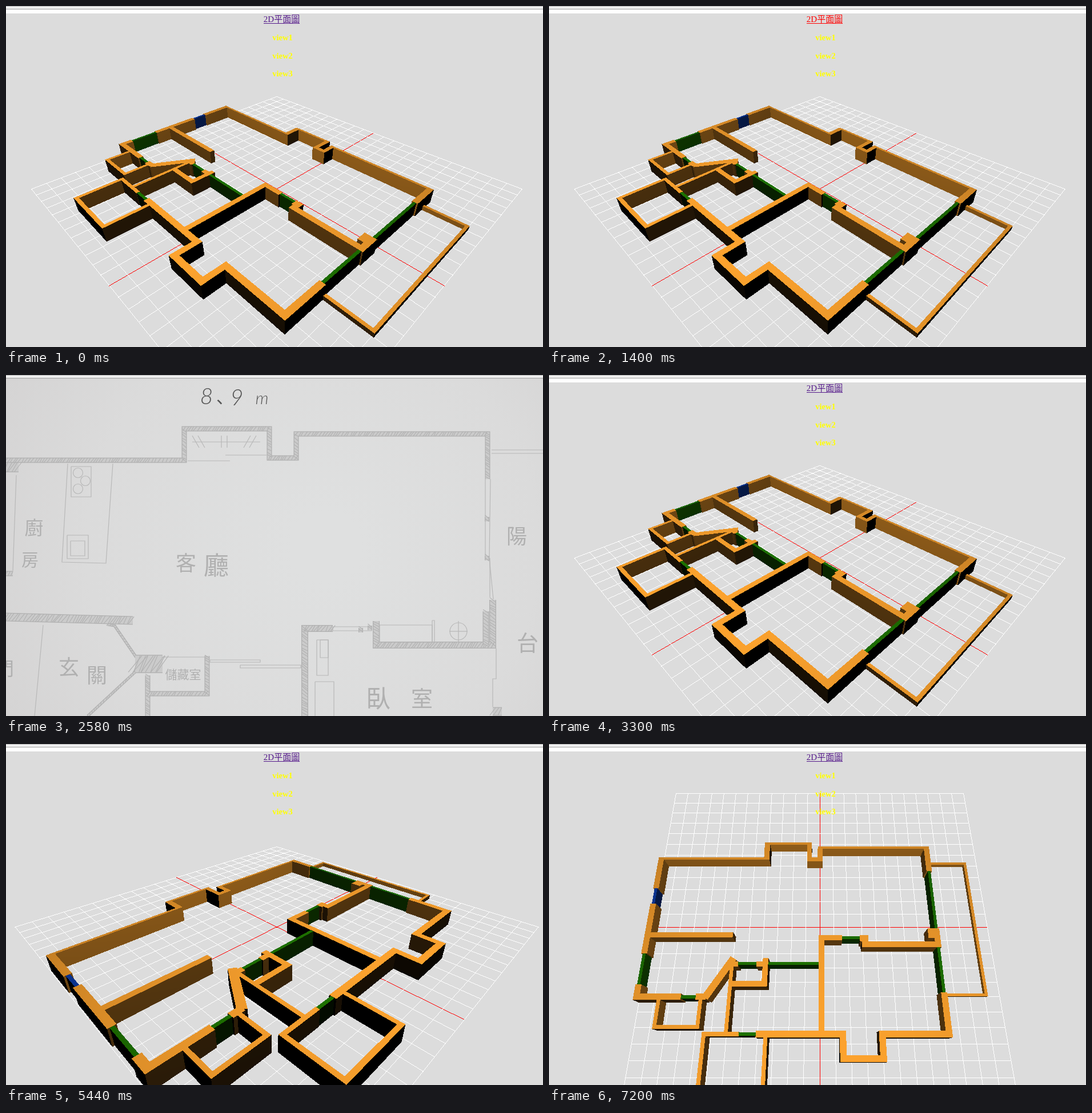
An HTML page with a canvas that plays this animation: 940 px wide and 596 px high, repeating every 8 s.

```html
<!DOCTYPE html>
<html lang="zh-Hant">
<head>
<meta charset="utf-8">
<title>Floor plan</title>
<style>
html, body { margin: 0; width: 100%; height: 100%; overflow: hidden; background: #dcdcdc; }
canvas { display: block; }
</style>
</head>
<body>
<canvas id="stage" width="940" height="596"></canvas>
<script>
const W = 940, H = 596, TOP = 13, CX = 474, CY = 320, FOCAL = 658;
const LIGHT = [0, 250, 100];
const ORANGE = [253, 163, 46], GREEN = [30, 116, 0], BLUE = [12, 62, 172];
const CJK = '"Noto Sans CJK JP", "Noto Sans CJK TC", "Noto Sans CJK", sans-serif';

// Right-angled path: a start point, then the next x, next y, next x, ...
function corners(x, y, ...rest) {
  const pts = [[x, y]];
  rest.forEach((v, i) => {
    if (i % 2) y = v; else x = v;
    pts.push([x, y]);
  });
  return pts;
}

// Calls fn(a, b, direction, length) for each segment that has a length
function eachSegment(pts, fn) {
  for (let i = 1; i < pts.length; i++) {
    const [a, b] = [pts[i - 1], pts[i]];
    const dx = b[0] - a[0], dy = b[1] - a[1], len = Math.hypot(dx, dy);
    if (len) fn(a, b, [dx / len, dy / len], len);
  }
}

// The model: wall runs along their centre lines, seen from above
const solids = [];
function build(thick, pts, color = ORANGE, height = 10) {
  const r = thick / 2;
  eachSegment(pts, (a, b, [dx, dz]) => {
    const at = (p, along, side) =>
      [p[0] + r * (along * dx - side * dz), p[1] + r * (along * dz + side * dx)];
    solids.push({ base: [at(a, -1, -1), at(b, 1, -1), at(b, 1, 1), at(a, -1, 1)], color, height });
  });
}
const run = (thick, ...path) => build(thick, corners(...path));
const panel = (color, ...path) => build(2, corners(...path), color, 9.9);

// Outer walls
run(4, -117.5, -50, -117.5, -28);
run(4, -117.5, -12, -117.5, 21);
run(4, -117.5, 46, -117.5, 52, -91);
run(2, -118, -51, -40);
run(4, -39.4, -63, -39.4, -52);
run(2, -40, -64, -7);
run(3.5, -7.75, -63.2, -7.75, -50, 0.25, -59.3);
run(2, 0.25, -60, 81);
run(4, 80, -59, 80, -42);
run(4, 80, 51, 80, 75, 38.6, 89.4, 14.3, 75, -37.6);
// Bedroom, pillar and kitchen
run(4, 80, 7, 80, 16.5, 30.6);
run(6, 77, 8, 77, 9);
run(4.6, 29.6, 12.3, 30.7);
run(3.8, 13.4, 11.8, 1.1, 72);
run(3.8, -116, 9.5, -61.2);
// Hall and closet
run(4, -77.5, 52, -75);
build(4.8, [[-58.7, 28.2], [-72.4, 50.6]]);
run(3.6, -57, 30.2, -55.8);
run(3.6, -40.2, 30.2, -36);
run(3.6, -36, 27.9, -36, 43.5, -57.5);
run(2.4, -58.1, 28, -58.1, 75);
// Side rooms
run(2.4, -103, 55, -103, 70.8, -76.2, 55);
run(2.5, -51.3, 75, -71.7, 105.3, -33.5, 77);
// Doors and windows
panel(BLUE, -117.5, -27, -117.5, -13);
panel(GREEN, -117.5, 22, -117.5, 45);
panel(GREEN, 80, -41, 80, 50);
panel(GREEN, 14, 11.6, 29);
panel(GREEN, -90, 52, -78);
panel(GREEN, -55, 30, -1);
panel(GREEN, -51, 75, -38);
build(2, corners(83, -50.4, 110, 49.2, 83), ORANGE, 3);

const dot = (a, b) => a[0] * b[0] + a[1] * b[1] + a[2] * b[2];

function makeLayer() {
  const layer = document.createElement("canvas");
  layer.width = W;
  layer.height = H;
  return [layer, layer.getContext("2d")];
}

// Camera that looks at the middle of the floor
function makeCamera(pos) {
  const dist = Math.hypot(...pos), flat = Math.hypot(pos[0], pos[2]);
  const fwd = pos.map(v => -v / dist);
  const right = [pos[2] / flat, 0, -pos[0] / flat];
  const up = [right[1] * fwd[2] - right[2] * fwd[1],
              right[2] * fwd[0] - right[0] * fwd[2],
              right[0] * fwd[1] - right[1] * fwd[0]];
  return p => {
    const w = dist + dot(fwd, p);
    return { x: CX + FOCAL * dot(right, p) / w, y: CY - FOCAL * dot(up, p) / w, q: 1 / w, p };
  };
}

function renderView(pos) {
  const project = makeCamera(pos);
  const [layer, ctx] = makeLayer();
  ctx.fillStyle = "#dcdcdc";
  ctx.fillRect(0, 0, W, H);
  const image = ctx.getImageData(0, 0, W, H), px = image.data;
  const depth = new Float32Array(W * H);

  function plot(x, y, q, r, g, b) {
    if (x < 0 || x >= W || y < TOP || y >= H) return;
    const i = y * W + x;
    if (q <= depth[i]) return;
    depth[i] = q;
    px[i * 4] = r;
    px[i * 4 + 1] = g;
    px[i * 4 + 2] = b;
  }

  function triangle(a, b, c, normal, color) {
    const area = (b.x - a.x) * (c.y - a.y) - (b.y - a.y) * (c.x - a.x);
    if (Math.abs(area) < 1e-6) return;
    const xs = [a.x, b.x, c.x], ys = [a.y, b.y, c.y];
    const x0 = Math.max(0, Math.floor(Math.min(...xs))), x1 = Math.min(W - 1, Math.ceil(Math.max(...xs)));
    const y0 = Math.max(TOP, Math.floor(Math.min(...ys))), y1 = Math.min(H - 1, Math.ceil(Math.max(...ys)));
    for (let y = y0; y <= y1; y++) for (let x = x0; x <= x1; x++) {
      const sx = x + 0.5, sy = y + 0.5;
      const u = ((c.x - b.x) * (sy - b.y) - (c.y - b.y) * (sx - b.x)) / area;
      const v = ((a.x - c.x) * (sy - c.y) - (a.y - c.y) * (sx - c.x)) / area;
      const t = 1 - u - v;
      if (u < 0 || v < 0 || t < 0) continue;
      const q = u * a.q + v * b.q + t * c.q;
      const ray = LIGHT.map((l, k) => l - (u * a.q * a.p[k] + v * b.q * b.p[k] + t * c.q * c.p[k]) / q);
      const lit = Math.max(0, dot(normal, ray) / Math.hypot(...ray));
      plot(x, y, q, color[0] * lit, color[1] * lit, color[2] * lit);
    }
  }

  function quad(points, normal, color) {
    const [a, b, c, d] = points.map(project);
    triangle(a, b, c, normal, color);
    triangle(a, c, d, normal, color);
  }

  function solid({ base, color, height }) {
    quad(base.map(([x, z]) => [x, height, z]), [0, 1, 0], color);
    eachSegment([...base, base[0]], ([x0, z0], [x1, z1], [dx, dz]) => {
      // Only sides turned to the camera
      if (dz * (pos[0] - x0) - dx * (pos[2] - z0) <= 0) return;
      quad([[x0, 0, z0], [x1, 0, z1], [x1, height, z1], [x0, height, z0]], [dz, 0, -dx], color);
    });
  }

  function line(from, to, color) {
    const a = project(from), b = project(to);
    const n = Math.ceil(Math.max(Math.abs(b.x - a.x), Math.abs(b.y - a.y)));
    for (let i = 0; i <= n; i++) {
      const t = i / n;
      plot(Math.floor(a.x + (b.x - a.x) * t), Math.floor(a.y + (b.y - a.y) * t),
        a.q + (b.q - a.q) * t, ...color);
    }
  }

  solids.forEach(solid);
  const cross = (k, color) => {
    line([-120, 0, k], [120, 0, k], color);
    line([k, 0, -120], [k, 0, 120], color);
  };
  cross(0, [255, 0, 0]);
  for (let k = -120; k <= 120; k += 10) if (k) cross(k, [255, 255, 255]);
  ctx.putImageData(image, 0, 0);
  return layer;
}

// Pencil drawing of the same flat
function renderPlan() {
  const [layer, ctx] = makeLayer();
  const paper = ctx.createRadialGradient(560, 300, 60, 520, 300, 620);
  paper.addColorStop(0, "#dfe0e0");
  paper.addColorStop(0.6, "#dbdbdb");
  paper.addColorStop(1, "#d4d3d3");
  ctx.fillStyle = paper;
  ctx.fillRect(0, 0, W, H);

  let seed = 7;
  const random = () => (seed = seed * 16807 % 2147483647) / 2147483647;

  function stroke(pts, color, width) {
    ctx.beginPath();
    pts.forEach(p => ctx.lineTo(...p));
    ctx.strokeStyle = color;
    ctx.lineWidth = width;
    ctx.stroke();
  }
  function hatch(width, pts) {
    stroke(pts, "#b0b0b0", width);
    stroke(pts, "#cbcbcb", width - 2.5);
    eachSegment(pts, ([x, y], _, [dx, dy], len) => {
      for (let s = 0; s < len; s += 3 + 4 * random()) {
        const r = width * 0.45, lean = r * (0.4 + 0.5 * random());
        const end = k => [x + dx * (s + k * lean) + k * dy * r, y + dy * (s + k * lean) - k * dx * r];
        stroke([end(-1), end(1)], "#b2b2b2", 1.2);
      }
    });
  }
  const thin = pts => stroke(pts, "#b8b8b8", 1.2);
  const wall = (width, ...path) => hatch(width, corners(...path));
  const edge = (...path) => thin(corners(...path));
  const box = (x, y, w, h) => edge(x, y, x + w, y + h, x, y);
  function ring(x, y, r) {
    ctx.beginPath();
    ctx.arc(x, y, r, 0, 7);
    ctx.stroke();
  }
  function word(text, x, y, size) {
    ctx.font = `300 ${size}px ${CJK}`;
    ctx.fillText(text, x, y);
  }

  // Outer walls and the niche
  wall(20, 0, 160, 22);
  wall(9, 0, 149, 312, 94, 461, 145, 508, 103, 843, 182);
  edge(318, 150, 392);
  edge(384, 140, 456);
  edge(326, 117, 445);
  for (let i = 0; i < 6; i++) {
    const x = 332 + 45 * (i >> 1) + 10 * (i % 2), lean = 6 - 6 * (i >> 1);
    thin([[x - lean, 106], [x + lean, 127]]);
  }

  // Windows and balcony
  edge(839, 182, 839, 320);
  thin([[848, 182], [846, 320], [853, 392]]);
  edge(847, 320, 847, 388);
  edge(858, 478, 858, 531, 852, 580);
  for (const y of [131, 137]) edge(850, y, 940);
  for (const [x, y] of [[842, 252], [842, 320], [621, 446], [637, 442]]) wall(8, x, y - 4, x, y + 4);

  // Bedroom
  wall(12, 852, 393, 852, 472, 648, 430);
  wall(11, 840, 413, 840, 472);
  wall(12, 572, 443, 523, 596);
  wall(15, 852, 588, 868);
  box(572, 440, 68, 7);
  box(654, 437, 92, 30);
  box(746, 429, 4, 38);
  ring(792, 448, 15);
  edge(792, 430, 792, 466);
  edge(776, 448, 808);
  box(544, 463, 20, 62);
  box(550, 463, 14, 31);
  box(541, 536, 33, 70);

  // Hall and closet
  hatch(15, [[0, 423], [222, 429]]);
  hatch(5, [[178, 436], [190, 438], [238, 508], [143, 596]]);
  wall(32, 226, 505, 274);
  wall(9, 248, 525, 248, 596);
  wall(9, 250, 557, 352, 491);
  edge(272, 493, 352);
  box(357, 498, 88, 4);
  box(410, 507, 106, 5);

  // Kitchen
  thin([[108, 155], [98, 327], [175, 329], [187, 155]]);
  box(114, 160, 35, 53);
  for (let i = 0; i < 3; i++) ring(126 + 13 * (i % 2), 171 + 14 * i, 8.5);
  box(107, 280, 37, 41);
  box(113, 290, 25, 26);
  thin([[18, 175], [12, 342]]);
  wall(9, 0, 347, 12);
  thin([[65, 437], [50, 596]]);

  ctx.textAlign = "center";
  ctx.textBaseline = "middle";
  ctx.fillStyle = "#b0b0b0";
  word("廚", 49, 266, 33);
  word("房", 42, 323, 30);
  word("客", 315, 328, 36);
  word("廳", 368, 332, 44);
  word("陽", 894, 281, 36);
  word("台", 913, 468, 38);
  word("玄", 110, 510, 36);
  word("關", 159, 524, 36);
  word("門", -2, 513, 32);
  word("儲藏室", 310, 523, 21);
  word("臥", 652, 565, 42);
  word("室", 728, 565, 38);

  ctx.fillStyle = "#555";
  word("、", 383, 38, 30);
  ctx.font = 'italic 300 39px Lato, "Open Sans", sans-serif';
  ctx.fillText("8", 351, 39);
  ctx.fillText("9", 404, 41);
  ctx.font = 'italic 300 29px Lato, "Open Sans", sans-serif';
  ctx.fillText("m", 448, 42);
  return layer;
}

const corner = renderView([150, 150, 150]);
const rear = renderView([-150, 120, 150]);
const above = renderView([0, 250, 100]);
const plan = renderPlan();
// End time, picture, link colour
const scenes = [
  [1400, corner], [1500, corner, "#f00"], [3300, plan], [4600, corner],
  [6000, rear], [7200, corner], [8000, above]
];
const stage = document.getElementById("stage").getContext("2d");

function bar(y, h, color) {
  stage.fillStyle = color;
  stage.fillRect(0, y, W, h);
}

function drawLinks(color) {
  stage.textAlign = "center";
  stage.font = `15px "Liberation Serif", ${CJK}`;
  stage.fillStyle = color;
  stage.fillText("2D平面圖", 482.5, 28);
  stage.fillRect(451, 30, 63, 1);
  stage.font = 'bold 14.5px "Liberation Serif", serif';
  stage.fillStyle = "#ff0";
  for (let i = 0; i < 3; i++) stage.fillText("view" + (i + 1), 484, 60 + i * 31.5);
}

function draw(now) {
  const t = now % 8000;
  const [, picture, linkColor = "#551a8b"] = scenes.find(s => t < s[0]);
  stage.drawImage(picture, 0, 0);
  bar(0, 5, "#f0f0f0");
  bar(0, 1, "#b8b8b8");
  bar(5, 1, "#a0a0a0");
  if (picture !== plan) {
    bar(6, 7, "#fff");
    drawLinks(linkColor);
  }
}

const start = performance.now();
function tick() {
  draw(performance.now() - start);
  requestAnimationFrame(tick);
}
tick();
</script>
</body>
</html>
```
